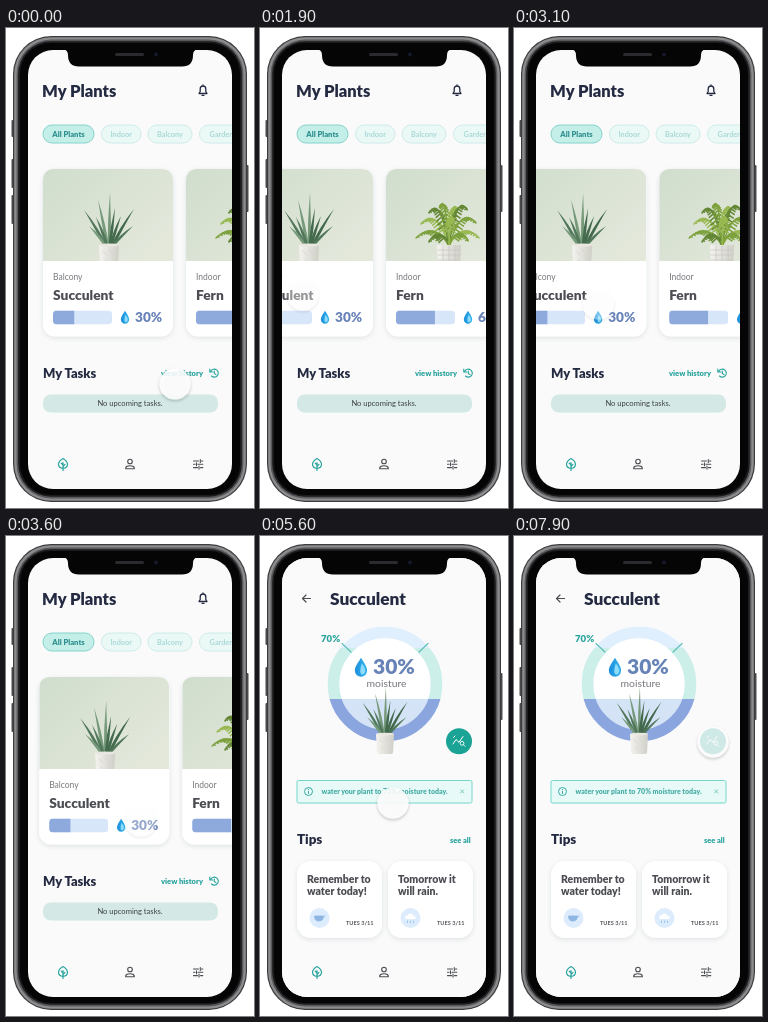
An HTML page that plays this animation: 248x480 px, repeating every 8 s.

```html
<!DOCTYPE html>
<html lang="en">
<head>
<meta charset="utf-8">
<title>Plant care app</title>
<style>
html, body { margin: 0; width: 100%; height: 100%; overflow: hidden; background: #fff; }
svg { display: block; width: 248px; height: 480px; }
text { font-family: Lato, "Open Sans", sans-serif; }
.b { font-weight: 700; }
.h { font-weight: 900; }
.line { fill: none; stroke-linecap: round; stroke-linejoin: round; }
</style>
</head>
<body>
<svg id="stage" viewBox="0 0 248 480" xmlns="http://www.w3.org/2000/svg">
  <defs>
    <linearGradient id="wall" x2="1" y2=".7">
      <stop offset="0" stop-color="#d0ddcd"/><stop offset="1" stop-color="#e3e8db"/>
    </linearGradient>
    <linearGradient id="pot" x2="1" y2="0">
      <stop offset="0" stop-color="#f4f3ef"/><stop offset="1" stop-color="#cfcfc8"/>
    </linearGradient>
    <linearGradient id="water" x2="1" y2="0">
      <stop offset="0" stop-color="#1c8fdc"/><stop offset="1" stop-color="#35b4ee"/>
    </linearGradient>
    <clipPath id="screen"><rect x="22" y="22" width="204" height="439" rx="25"/></clipPath>
    <clipPath id="photo"><path d="M0 92V12Q0 0 12 0H118Q130 0 130 12V92Z"/></clipPath>
    <clipPath id="bar"><rect width="59" height="14" rx="4"/></clipPath>
    <clipPath id="low"><rect x="60" y="163" width="130" height="45"/></clipPath>
    <clipPath id="mid"><rect x="60" y="112" width="130" height="51"/></clipPath>
    <filter id="soft" x="-20%" y="-20%" width="140%" height="150%">
      <feDropShadow dx="0" dy="1.5" stdDeviation="2.2" flood-color="#34445a" flood-opacity=".13"/>
    </filter>
    <filter id="lift" x="-50%" y="-50%" width="200%" height="200%">
      <feDropShadow dx="0" dy="1.5" stdDeviation="1.7" flood-color="#222" flood-opacity=".28"/>
    </filter>
  </defs>
  <g id="phone"></g>
  <g clip-path="url(#screen)">
    <rect x="22" y="22" width="204" height="439" fill="#fafafa"/>
    <g id="home"></g>
    <g id="detail"></g>
    <g id="tabs"></g>
  </g>
  <path d="M57 21Q62 22 62 27Q62 38.5 73 38.5H176Q187 38.5 187 27Q187 22 192 21Z" fill="#050506"/>
  <rect x="109" y="25" width="29" height="3" rx="1.5" fill="#2a2b2e"/>
  <circle cx="150" cy="26.5" r="2" fill="#15192a"/>
  <g id="pointer"><circle r="15.5" fill="#fff" fill-opacity=".86" filter="url(#lift)"/></g>
</svg>
<script>
const $ = id => document.getElementById(id);
const NAVY = '#242a42', INK = '#4b4d52', TEAL = '#27a39d', BLUE = '#6883b8';

const text = (x, y, size, fill, str, cls = '', extra = '') =>
  `<text x="${x}" y="${y}" font-size="${size}" fill="${fill}" class="${cls}" ${extra}>${str}</text>`;
const rect = (x, y, w, h, r, fill, extra = '') =>
  `<rect x="${x}" y="${y}" width="${w}" height="${h}" rx="${r}" fill="${fill}" ${extra}/>`;
const circle = (x, y, r, fill, extra = '') => `<circle cx="${x}" cy="${y}" r="${r}" fill="${fill}" ${extra}/>`;
const line = (d, color, width = 1) => `<path d="${d}" class="line" stroke="${color}" stroke-width="${width}"/>`;
const at = (x, y, body, scale = 1) => `<g transform="translate(${x} ${y}) scale(${scale})">${body}</g>`;

const drop = (x, y, s) => at(x, y,
  '<path d="M0-7C2-3.5 4.4-.8 4.4 2.2A4.4 4.4 0 0 1-4.4 2.2C-4.4-.8-2-3.5 0-7Z" fill="url(#water)"/>' +
  '<path d="M.6-3Q3.2.5 3 2.6Q2.6 5 .4 5Q-1.6 3.6.6-3Z" fill="#8fdcfa"/>', s);

// A tapering leaf from the pot's rim to a tip
function blade(tx, ty, color, bx = 0, w = 2) {
  const mx = bx + (tx - bx) * .4, my = ty * .48;
  const len = Math.hypot(tx, ty), nx = -ty / len * w, ny = tx / len * w;
  return `<path d="M${bx - 1.5} 1Q${mx - nx} ${my - ny} ${tx} ${ty}Q${mx + nx} ${my + ny} ${bx + 1.5} 1Z" fill="${color}"/>`;
}

function succulent() {
  const tips = [[-25, -36], [-20, -20], [25, -37], [24, -20], [-11, -46], [12, -30], [-13, -29], [1, -53], [6, -38]];
  const greens = ['#52785c', '#76997a', '#436a4d'];
  return tips.map(([x, y], i) => blade(x, y, greens[i % 3], x * .12)).join('') +
    '<path d="M-10-1H10L9 19Q9 21 7 21H-7Q-9 21-9 19Z" fill="url(#pot)"/>' +
    '<ellipse cy="-1" rx="10" ry="1.6" fill="#e9e7df"/>' +
    line('M-6 5L-2 9M0 4L4 8M-4 13L0 17M4 12L7 15', '#d5d3ca', .8);
}

function frond(tx, ty, color) {
  const cx = tx * .45, cy = ty - 18;
  let d = `M0 0Q${cx} ${cy} ${tx} ${ty}`;
  for (let u = .25; u < 1; u += .07) {
    const v = 1 - u, x = 2 * u * v * cx + u * u * tx, y = 2 * u * v * cy + u * u * ty;
    const s = 6 * (1.15 - u);
    d += `M${x - s} ${y + s * .9}L${x} ${y}L${x + s} ${y + s * .7}`;
  }
  return line(d, color, 1.5);
}

function fern() {
  const tips = [[-33, -8], [-28, -22], [-20, -33], [-9, -38], [8, -35], [18, -36], [27, -23], [30, -8], [-20, -4], [19, -5], [3, -24]];
  const greens = ['#7da13c', '#98b851', '#638735'];
  return tips.map(([x, y], i) => frond(x, y, greens[i % 3])).join('') +
    '<path d="M-12-1H12L11 20H-11Z" fill="url(#pot)"/>' +
    line('M-11 4H11M-11 9H11M-11 14H11M-6 0V16M0 0V16M6 0V16', '#c6c5bd', .7);
}

function plantCard(x, place, name, level, percent, plant, px) {
  return at(x, 141,
    rect(0, 0, 130, 167.5, 12, '#fff', 'filter="url(#soft)"') +
    `<g clip-path="url(#photo)">${rect(0, 0, 130, 92, 0, 'url(#wall)')}${at(px, 77, plant)}</g>` +
    text(10, 111, 8.5, '#77797d', place) +
    text(10, 131, 13.8, INK, name, 'h') +
    at(10, 141.5, `<g clip-path="url(#bar)">${rect(0, 0, 59, 14, 0, '#d8e6fa')}${rect(0, 0, 59 * level, 14, 0, '#8ea9dc')}</g>`) +
    drop(82, 148.5, .95) + text(92, 153.3, 13.6, BLUE, percent, 'h'));
}

function chip(x, w, label, active) {
  const [fill, stroke, ink] = active ? ['#c3efe8', '#84d3cb', '#2f8f8f'] : ['#eaf8f6', '#cdece9', '#a9dad7'];
  return rect(x, 97, w, 18, 9, fill, `stroke="${stroke}"`) +
    text(x + w / 2, 108.5, active ? 7.6 : 7.3, ink, label, active ? 'h' : 'b', 'text-anchor="middle"');
}

function tipCard(x, first, second, icon) {
  return at(x, 326, rect(0, -1, 85, 77, 14, '#fff', 'filter="url(#soft)"') +
    text(10, 21, 10.5, INK, first, 'h') + text(10, 33, 10.5, INK, second, 'h') +
    circle(22.5, 56, 10, '#dcecfc') + at(22.5, 56, icon) +
    text(49, 63, 5.6, '#55575c', 'TUES 3/11', 'b'));
}

// Outer edge, steel band, inner groove and black bezel
const shell = (inset, fill) => rect(7 + inset, 8 + inset, 234 - 2 * inset, 466 - 2 * inset, 38 - inset, fill);
$('phone').innerHTML =
  [[92, 17], [131, 29], [167, 29]].map(([y, h]) => rect(5.5, y, 3, h, 1, '#4a4a4d')).join('') +
  rect(239.5, 137, 3, 47, 1, '#4a4a4d') +
  shell(0, '#3c3c3e') + shell(1.2, '#8c8c8f') + shell(3.6, '#58585b') + shell(5.2, '#1b1b1d') + shell(7, '#050506');

$('home').innerHTML =
  text(36, 69, 16.5, NAVY, 'My Plants', 'h') +
  line('M193 65.5H201L199.8 63.5V61Q199.8 58 197 58Q194.2 58 194.2 61V63.5ZM197 57V58M196 67.3H198', NAVY, 1.3) +
  chip(37, 51, 'All Plants', true) + chip(95.5, 39.5, 'Indoor') + chip(142, 44, 'Balcony') + chip(193.5, 44, 'Garden') +
  `<g id="cards">${plantCard(37, 'Balcony', 'Succulent', .36, '30%', succulent(), 66)}${
    plantCard(180, 'Indoor', 'Fern', .66, '66%', fern(), 63)}</g>` +
  text(37, 350, 12.9, NAVY, 'My Tasks', 'h') +
  text(155, 348, 7.6, TEAL, 'view history', 'h') +
  line('M204.8 343.2A4 4 0 1 1 205.5 348M203.8 341V344H206.8M208.3 343V345.5L210 346.6', TEAL, 1.1) +
  rect(37, 366.5, 175, 18, 7.5, '#d4e9e5') +
  text(124, 378.3, 7.6, '#3c4045', 'No upcoming tasks.', '', 'text-anchor="middle"');

const ring = (color, clip) => circle(125, 148, 51.5, 'none', `stroke="${color}" stroke-width="11.5" ${clip ? `clip-path="url(#${clip})"` : ''}`);
const bowl = '<path d="M-5-2H4Q4 3-1 3Q-5 3-5-2ZM4-1L6-2.5" fill="#8fb5e2" stroke="#8fb5e2" stroke-width=".8"/>';
const cloud = '<path d="M-4 1Q-6 1-5.5-1Q-5-3-3-2.5Q-2-5 1-4.2Q3-3.8 3-2Q5.5-2 5.5 0Q5 1 4 1Z" fill="#fff"/>' +
  line('M-3 3V4.5M0 3V4.5M3 3V4.5', '#8dc2ec', .9);

$('detail').innerHTML =
  rect(22, 22, 204, 439, 0, '#fafafa') +
  line('M50.5 62.5H42.5M46 59L42.5 62.5L46 66', INK, 1.2) +
  text(70, 69, 17.3, NAVY, 'Succulent', 'h') +
  circle(125, 148, 56, '#fff') +
  circle(125, 148, 47, '#d5e3f7', 'clip-path="url(#low)"') +
  ring('#e0effd') + ring('#cdefe9', 'mid') + ring('#8ba6de', 'low') +
  line('M82 107.5L91 116M168 107.5L159 116', '#5fc0b8', 1.2) +
  text(61, 105.5, 9.6, TEAL, '70%', 'h') +
  drop(101, 131.5, 1.4) + text(113, 137.5, 21, BLUE, '30%', 'h') +
  text(126.5, 151, 10.4, '#74767c', 'moisture', '', 'text-anchor="middle"') +
  at(125, 199, succulent(), .9) +
  circle(199, 205.3, 13, '#1ba396') +
  line('M193 208L196 203.5L199 206.3L203 200.5M193.5 201.5L195 200', '#fff', 1) +
  circle(202, 207.3, 1.9, 'none', 'stroke="#fff" stroke-width=".9"') + line('M203.5 208.8L205 210.3', '#fff', .9) +
  rect(37, 244.5, 175, 22.5, 1.5, '#e7faf7', 'stroke="#74d6cb"') +
  circle(48.5, 255.5, 4, 'none', `stroke="${TEAL}" stroke-width=".9"`) + line('M48.5 255.3V257.5M48.5 253.4V253.5', TEAL, .9) +
  text(61.5, 257.5, 7, '#48aea6', 'water your plant to 70% moisture today.', 'h') +
  line('M200.7 253.9L203.8 257M203.8 253.9L200.7 257', '#6fc2ba', .9) +
  text(37, 308, 13.4, NAVY, 'Tips', 'h') + text(190, 306.5, 7.4, TEAL, 'see all', 'h') +
  tipCard(37, 'Remember to', 'water today!', bowl) + tipCard(128, 'Tomorrow it', 'will rain.', cloud);

$('tabs').innerHTML =
  line('M57 430.5Q61.5 433 61.5 436.5Q61.3 440 57 440.5Q52.7 440 52.5 436.5Q52.5 433 57 430.5ZM57 434.5V442.5M57 438.5L59 436.4M57 437L55.2 435.2', TEAL, 1.2) +
  circle(124, 433.5, 2.3, 'none', `stroke="${INK}" stroke-width="1.1"`) +
  line('M119.7 440.8V439.8Q120.3 437.8 124 437.8Q127.7 437.8 128.3 439.8V440.8Z', INK, 1.1) +
  line('M187.5 433H192.5M195.5 433H196.8M194.3 431.5V434.5M187.5 436.3H189M192 436.3H196.8M190.5 434.8V437.8M187.5 439.6H191.5M194.5 439.6H196.8M193 438.1V441.1', INK, 1.1);

// Eased interpolation through [time, ...values] stops
function track(stops, t) {
  let i = 1;
  while (i < stops.length - 1 && t > stops[i][0]) i++;
  const [a, b] = [stops[i - 1], stops[i]];
  const p = Math.min(1, Math.max(0, (t - a[0]) / (b[0] - a[0])));
  const e = p * p * (3 - 2 * p);
  return a.slice(1).map((v, k) => v + (b[k + 1] - v) * e);
}

const SCROLL = [[900, 0], [1900, -54], [2600, -54], [3900, 4], [4700, 4]];
// time, x, y, opacity
const POINTER = [[0, 169, 356, 1], [800, 112, 267, .8], [1400, 78, 267, .3], [2100, 34, 267, .5], [2600, 34, 267, .5],
  [3600, 135, 285, .35], [4300, 136, 270, 1], [4800, 136, 270, 1], [5600, 133, 267, 1], [6600, 133, 267, 1], [7600, 199, 206, .9]];

function render(t) {
  const [scroll] = track(SCROLL, t);
  const [x, y, opacity] = track(POINTER, t);
  const [shown] = track([[4900, 0], [5200, 1]], t);
  $('cards').setAttribute('transform', `translate(${scroll} 0)`);
  $('detail').setAttribute('opacity', shown);
  $('pointer').setAttribute('transform', `translate(${x} ${y})`);
  $('pointer').setAttribute('opacity', opacity);
}

const start = performance.now();
function tick() {
  const t = (performance.now() - start) % 8000;
  render(Math.floor(t / 100) * 100);
  requestAnimationFrame(tick);
}
tick();
</script>
</body>
</html>
```
